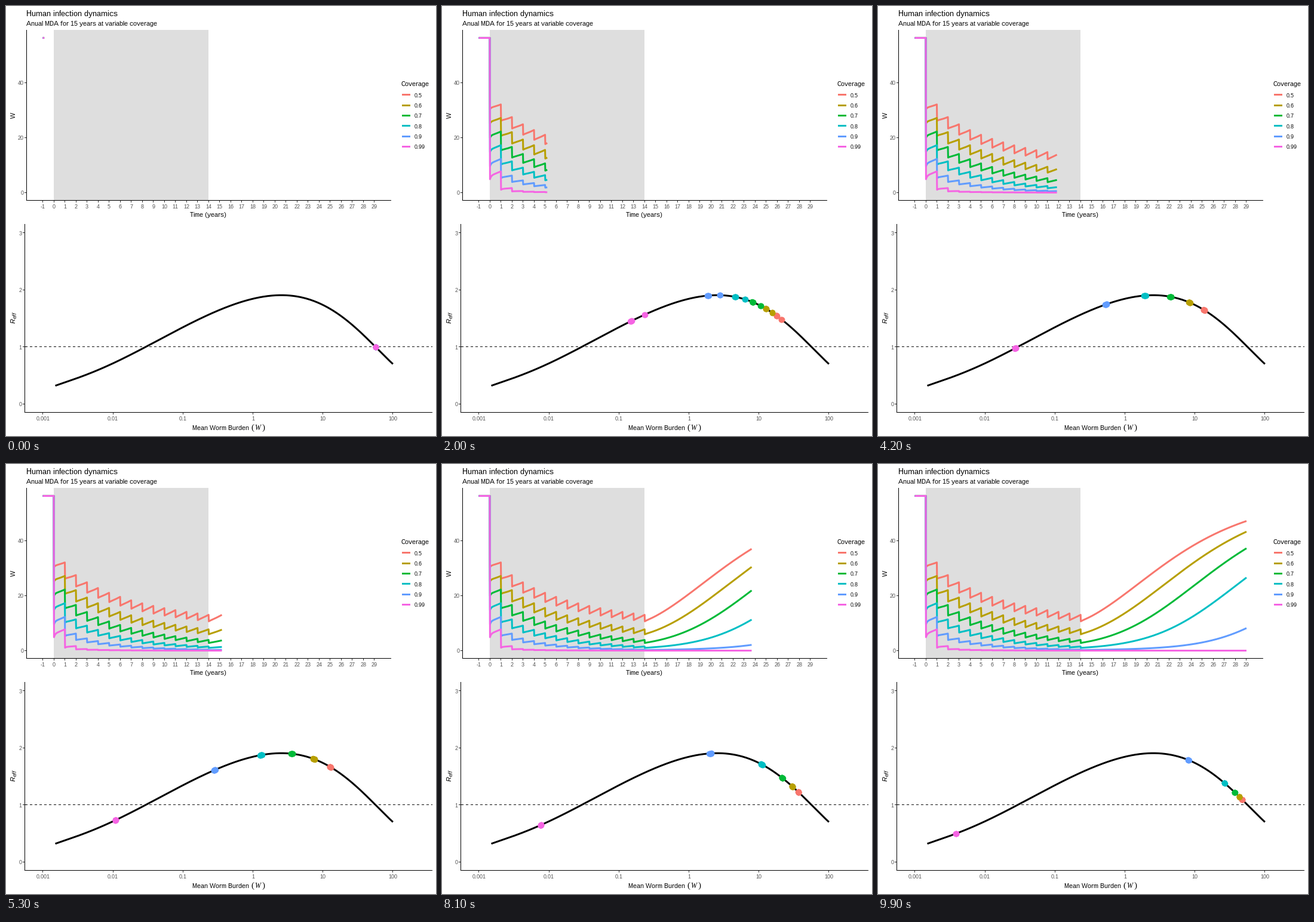
Recreate the animation shown at these times as a matplotlib script. Size 720x720 px, loop 10 s.

```python
import numpy as np
import matplotlib.pyplot as plt
from matplotlib.animation import FuncAnimation
from matplotlib.patches import Rectangle

plt.rcParams.update({
    "font.family": "Liberation Sans",
    "text.hinting": "native",
    "text.hinting_factor": 1,
})

SIZE, DPI = 720, 72
FRAMES, INTERVAL = 100, 100
COVERAGE = [0.5, 0.6, 0.7, 0.8, 0.9, 0.99]
COLORS = ["#F8766D", "#B79F00", "#00BA38", "#00BFC4", "#619CFF", "#F564E3"]
T0, T1, LAST_ROUND = -1, 29, 14
DT, SUBSTEPS = 0.02, 4
WORM_DEATH, LARVA_DEATH, EFFICACY = 0.313, 8.8, 0.928

# Effective reproduction number against log10 of the mean burden
KNOTS = np.array([
    (-2.820, 0.3225), (-2.521, 0.443), (-2.189, 0.6105), (-2.001, 0.715),
    (-1.762, 0.8565), (-1.523, 1.0), (-1.327, 1.129), (-1.096, 1.286),
    (-0.7125, 1.5215), (-0.508, 1.631), (-0.277, 1.747), (0, 1.846),
    (0.226, 1.891), (0.397, 1.903), (0.636, 1.880), (0.951, 1.7675),
    (1.148, 1.637), (1.284, 1.516), (1.395, 1.4115), (1.583, 1.202),
    (1.749, 1.0), (2.001, 0.6995),
])
log_w = np.linspace(np.log10(0.0015), 2, 400)
curve = np.polyval(np.polyfit(KNOTS[:, 0], KNOTS[:, 1], 7), log_w)
falling = log_w > 1
W_START = 10 ** np.interp(-1, -curve[falling], log_w[falling])


def r_eff(w):
    return np.interp(np.log10(w), log_w, curve)


def simulate():
    """Mean burden per coverage; the same people are treated every year."""
    cov = np.array(COVERAGE)
    treated = np.full(len(cov), W_START)
    missed = treated.copy()
    larvae = treated.copy()
    per_year = round(1 / DT)
    steps = (T1 - T0) * per_year
    h = DT / SUBSTEPS
    rows = []
    for n in range(steps + 1):
        rows.append(cov * treated + (1 - cov) * missed)
        year, rest = divmod(n, per_year)
        if rest == 0 and 0 <= year + T0 <= LAST_ROUND:
            treated = treated * (1 - EFFICACY)
        for _ in range(SUBSTEPS):
            eggs = (cov * treated * r_eff(treated)
                    + (1 - cov) * missed * r_eff(missed))
            treated = treated + h * WORM_DEATH * (larvae - treated)
            missed = missed + h * WORM_DEATH * (larvae - missed)
            larvae = larvae + h * LARVA_DEATH * (eggs - larvae)
    return np.linspace(T0, T1, steps + 1), np.array(rows)


def time_x(t):
    return 80 + 18.517 * t


def burden_y(w):
    return 312.5 - 4.6 * w


def log_x(u):
    return 413.5 + 117.2 * u


def r_y(r):
    return 666.3 - 95.5 * r


def mid(v):
    """Centre of the pixel that holds v."""
    return np.floor(v) + 0.5


times, burden = simulate()
row_frame = np.rint((times - T0) / (T1 - T0) * (FRAMES - 1)).astype(int)
line_x, line_y = time_x(times), burden_y(burden)
dot_x, dot_y = log_x(np.log10(burden)), r_y(r_eff(burden))

fig = plt.figure(figsize=(SIZE / DPI, SIZE / DPI), dpi=DPI, facecolor="white")
ax = fig.add_axes([0, 0, 1, 1])
ax.set(xlim=(0, SIZE), ylim=(SIZE, 0))
ax.axis("off")


def label(x, y, s, size=11, color="black", ha="left", **kw):
    ax.text(x, y, s, size=size, color=color, ha=ha, va="baseline", **kw)


def upright(x, y, s, size=11, **kw):
    label(x, y, s, size, rotation=90, rotation_mode="anchor", **kw)


def stroke(xs, ys, color="black", width=1, **kw):
    return ax.plot(xs, ys, color=color, lw=width, snap=False,
                   solid_capstyle="butt", solid_joinstyle="round", **kw)[0]


def axes_frame(left, right, top, bottom, xticks, yticks):
    for x, s in xticks:
        stroke([mid(x)] * 2, [bottom, bottom + 3.5], "#333333")
        label(x, bottom + 13.5, s, 9, "#4D4D4D", "center")
    for y, s in yticks:
        stroke([left - 3.5, left], [mid(y)] * 2, "#333333")
        label(left - 5, y + 4, s, 9, "#4D4D4D", "right")
    stroke([left, left], [top, bottom + 0.5])
    stroke([left - 0.5, right], [bottom, bottom])


# Burden over time
ax.add_patch(Rectangle((80, 40), 259, 285, color="#DEDEDE", lw=0))
axes_frame(34.5, 645, 40, 325.5,
           [(time_x(t), str(t)) for t in range(T0, T1 + 1)],
           [(burden_y(w), str(w)) for w in (0, 20, 40)])
label(34, 17, "Human infection dynamics", 13)
label(34, 33, "Anual MDA for 15 years at variable coverage")
label(338.5, 353, "Time (years)", ha="center")
upright(15.5, 183.5, "W", ha="center")

# Legend
label(662, 134, "Coverage")
for k, (c, color) in enumerate(zip(COVERAGE, COLORS)):
    y = 148.9 + 17.28 * k
    stroke([663, 677], [mid(y)] * 2, color, 3)
    label(684, y + 4, str(c), 9)

# Reproduction number against burden
axes_frame(31.5, 714, 365, 680.5,
           [(log_x(e), f"{10.0 ** e:g}") for e in range(-3, 3)],
           [(r_y(r), str(r)) for r in range(4)])
label(312, 710, "Mean Worm Burden")
label(410.5, 710, "(", 14, family="Liberation Serif")
label(416, 710, "W", 12, family="Liberation Serif", style="italic")
label(428.5, 710, ")", 14, family="Liberation Serif")
upright(15.5, 531, "R", style="italic")
upright(17.5, 523, "eff", 9, style="italic")
stroke(log_x(log_w), r_y(curve), width=3)
stroke([32, 714], [mid(r_y(1))] * 2, linestyle=(0, (4, 4)))

lines = [stroke([], [], c, 3, zorder=4) for c in COLORS]
dots = [ax.plot([], [], "o", color=c, ms=9.5, mew=0, zorder=5)[0]
        for c in COLORS]


def update(i):
    shown = row_frame <= i
    now = row_frame == i
    for k, (line, dot) in enumerate(zip(lines, dots)):
        line.set_data(line_x[shown], line_y[shown, k])
        dot.set_data(dot_x[now, k], dot_y[now, k])
    return lines + dots


anim = FuncAnimation(fig, update, frames=FRAMES, interval=INTERVAL,
                     repeat=True, repeat_delay=0)
plt.show()
```
